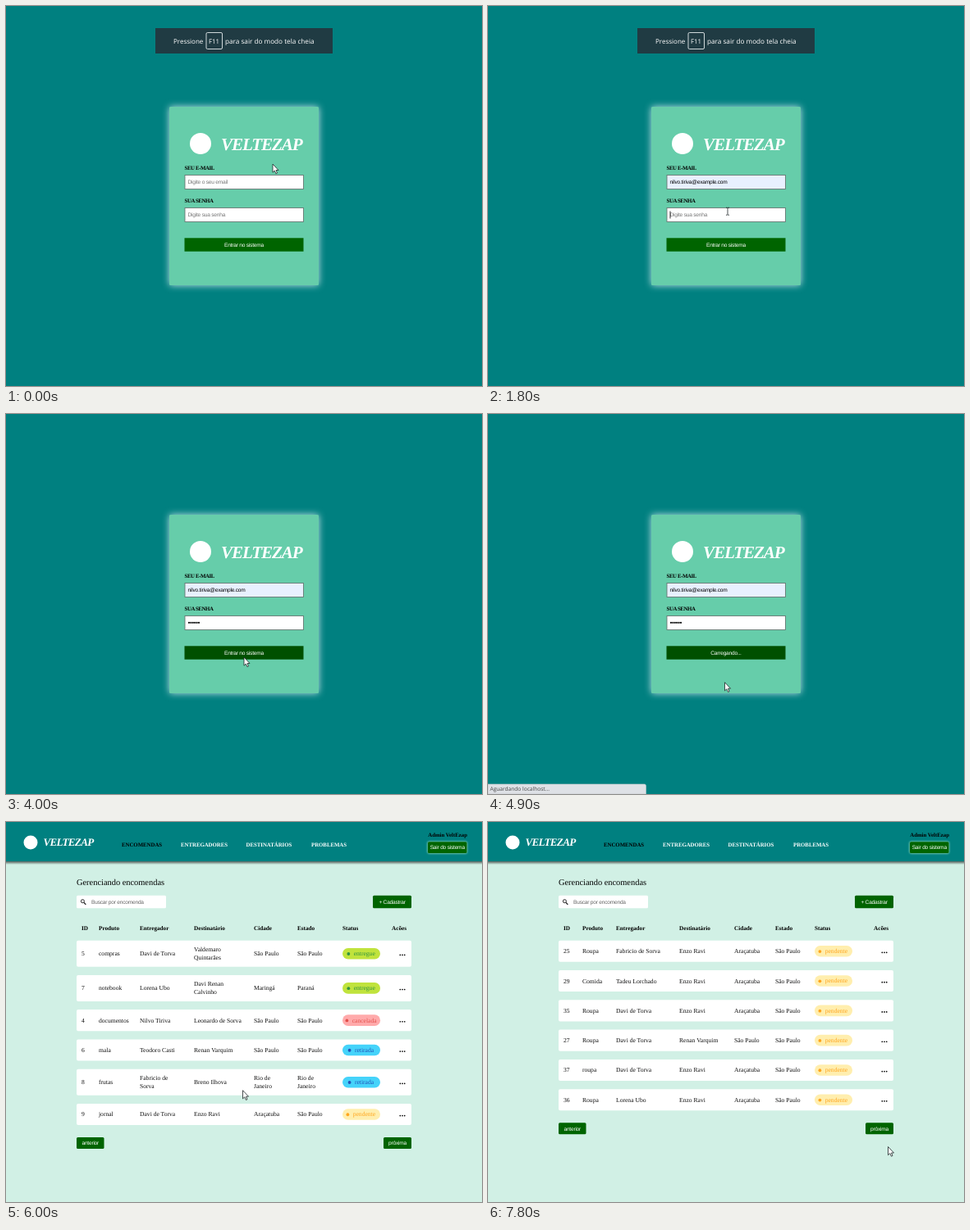
Animation of 580 by 464 pixels, one loop 8 s. Source, as an HTML page:

```html
<!DOCTYPE html>
<html lang="pt-BR">
<head>
<meta charset="utf-8">
<title>Gerenciando encomendas</title>
<style>
html, body { margin: 0; width: 100%; height: 100%; overflow: hidden; background: #008080; }
svg { display: block; width: 100vw; height: 100vh; text-rendering: geometricPrecision; }
.serif { font-family: "Liberation Serif", serif; }
.sans { font-family: "Liberation Sans", sans-serif; letter-spacing: -.033em; }
.ui { font-family: "Open Sans", "Noto Sans", sans-serif; }
.b { font-weight: 700; }
.i { font-style: italic; }
.tight { letter-spacing: -.055em; }
</style>
</head>
<body>
<svg viewBox="0 0 580 464" xmlns="http://www.w3.org/2000/svg">
  <defs>
    <filter id="glow" x="-20%" y="-20%" width="140%" height="140%"><feGaussianBlur stdDeviation="4"/></filter>
    <filter id="soft" x="-20%" y="-50%" width="140%" height="200%"><feGaussianBlur stdDeviation="1.2"/></filter>
    <linearGradient id="shade" x1="0" y1="0" x2="0" y2="1">
      <stop offset="0" stop-color="#000" stop-opacity=".6"/>
      <stop offset="1" stop-color="#000" stop-opacity="0"/>
    </linearGradient>
  </defs>
  <g id="stage"></g>
</svg>
<script>
const LOOP = 8000, STEP = 100;
const stage = document.getElementById('stage');
const GREEN = '#006400', DARK = '#005000';
const EMAIL = 'nilvo.tiriva@example.com';

// Event times in ms
const AT = {
  open: 600, hint: 900, pick: 1400, focus: 1700, fade: 2300, faded: 2800,
  keys: [2400, 2600, 2900, 3100, 3400, 3500],
  hover: 4000, submit: 4700, status: 4800, home: 5000, rows: 5300,
  nextHover: 6900, nextPage: 7300
};

// Pointer stops: time, x, y
const PATH = [
  [100, 325, 193], [500, 300, 215], [600, 298, 216], [900, 295, 243.5],
  [1400, 295, 243.5], [1700, 292, 250.7], [3900, 292, 250.7], [4000, 290, 297],
  [4600, 290, 297], [4900, 288.5, 327.7], [6000, 288.5, 327.7],
  [6800, 486, 402], [6900, 486, 400], [7100, 487.5, 396.5]
];

const STATUS = { // background, text colour, text width
  entregue: ['#c0e33c', '#2f9440', 26.1],
  cancelada: ['#ffaaab', '#e2504c', 30],
  retirada: ['#45d3fa', '#2453b8', 23.6],
  pendente: ['#ffeeae', '#ffa51e', 28]
};

const HEADS = ['ID', 'Produto', 'Entregador', 'Destinatário', 'Cidade', 'Estado', 'Status'];
const EMPTY = { cols: [92, 121, 173, 241, 314, 361, 408], rows: [] };
const PAGE1 = {
  cols: [92, 113, 163, 229, 302, 355, 410],
  rows: [
    '5;compras;Davi de Torva;Valdemaro|Quintarães;São Paulo;São Paulo;entregue',
    '7;notebook;Lorena Ubo;Davi Renan|Calvinho;Maringá;Paraná;entregue',
    '4;documentos;Nilvo Tiriva;Leonardo de Sorva;São Paulo;São Paulo;cancelada',
    '6;mala;Teodoro Casti;Renan Varquim;São Paulo;São Paulo;retirada',
    '8;frutas;Fabricio de|Sorva;Breno Ilhova;Rio de|Janeiro;Rio de|Janeiro;retirada',
    '9;jornal;Davi de Torva;Enzo Ravi;Araçatuba;São Paulo;pendente'
  ]
};
const PAGE2 = {
  cols: [92, 115, 156, 233, 300, 350, 398],
  rows: [
    '25;Roupa;Fabricio de Sorva;Enzo Ravi;Araçatuba;São Paulo;pendente',
    '29;Comida;Tadeu Lorchado;Enzo Ravi;Araçatuba;São Paulo;pendente',
    '35;Roupa;Davi de Torva;Enzo Ravi;Araçatuba;São Paulo;pendente',
    '27;Roupa;Davi de Torva;Renan Varquim;São Paulo;São Paulo;pendente',
    '37;roupa;Davi de Torva;Enzo Ravi;Araçatuba;São Paulo;pendente',
    '36;Roupa;Lorena Ubo;Enzo Ravi;Araçatuba;São Paulo;pendente'
  ]
};

const rect = (x, y, w, h, fill, rx = 0, more = '') =>
  `<rect x="${x}" y="${y}" width="${w}" height="${h}" fill="${fill}" rx="${rx}" ${more}/>`;
const dot = (x, y, r, fill) => `<circle cx="${x}" cy="${y}" r="${r}" fill="${fill}"/>`;
const text = (s, x, y, size, cls, fill = '#000', anchor = 'start') =>
  `<text x="${x}" y="${y}" font-size="${size}" class="${cls}" fill="${fill}" text-anchor="${anchor}">${s}</text>`;
const button = (s, x, y, w, h, fill = GREEN, rx = 1.5) =>
  rect(x, y, w, h, fill, rx) + text(s, x + w / 2, y + h / 2 + 2.3, 6.6, 'sans', '#fff', 'middle');
const field = (y, fill) => rect(218, y, 144.5, 17, fill, 0, 'stroke="#677873" stroke-width=".9"');
const caret = (x, y) => rect(x, y - 4.5, .8, 9, '#000');

function pointerAt(t) {
  if (t <= PATH[0][0]) return PATH[0].slice(1);
  for (let i = 1; i < PATH.length; i++) {
    const [t0, x0, y0] = PATH[i - 1], [t1, x1, y1] = PATH[i];
    if (t < t1) {
      const k = (t - t0) / (t1 - t0), e = k * k * (3 - 2 * k);
      return [x0 + (x1 - x0) * e, y0 + (y1 - y0) * e];
    }
  }
  return PATH[PATH.length - 1].slice(1);
}

function pointer(t) {
  const [x, y] = pointerAt(t);
  const menu = t >= AT.open && t < AT.pick;
  const typing = t < AT.home && !menu && (y > 206 && y < 223 || y > 246 && y < 264);
  const d = typing
    ? 'M-2-4.5h1.5l.5.5.5-.5h1.5M0-4v8M-2 4.5h1.5l.5-.5.5.5h1.5'
    : 'M0 0V10.2L2.3 8.1 3.9 11.7 5.5 11 4 7.5H7Z';
  return `<path transform="translate(${x} ${y})" d="${d}" fill="${typing ? 'none' : '#fff'}"
    stroke="#1c2426" stroke-width=".8" stroke-linejoin="round"/>`;
}

function banner(t) {
  const o = Math.min(1, Math.max(0, (AT.faded - t) / (AT.faded - AT.fade)));
  if (!o) return '';
  return `<g opacity="${o}">` + rect(182, 27, 216, 31, '#203b43') +
    text('Pressione', 204, 45.6, 8, 'ui', '#fff') +
    rect(244, 32.5, 19.5, 20, 'none', 1.5, 'stroke="#e4eaeb" stroke-width=".9"') +
    text('F11', 253.5, 45.6, 7.8, 'ui', '#fff', 'middle') +
    text('para sair do modo tela cheia', 267, 45.6, 8.2, 'ui', '#fff') + '</g>';
}

function menu(t) {
  const items = [EMAIL, 'teste1@example.com', 'nilvo@br.example.com',
    'nilvo@ch.example.com', 'nilvo@au.example.com', 'qwerz@a.example'];
  return rect(217.5, 224.5, 145, 140, '#fff', 1.5) +
    (t >= AT.hint ? rect(217.5, 230, 145, 21.3, '#c8c8c8') : '') +
    items.map((s, i) => text(s, 224, 243 + 21.8 * i, 7.3, 'ui', '#222')).join('');
}

function login(t) {
  const typed = AT.keys.filter(k => k <= t);
  const last = typed.length ? typed[typed.length - 1] : AT.focus;
  const onEmail = t >= AT.open && t < AT.focus;
  const onPass = t >= AT.focus && t < AT.submit;
  const filled = t >= AT.hint;
  const busy = t >= AT.submit;
  let s = rect(0, 0, 580, 464, '#008080') + banner(t) +
    rect(199, 123, 182, 218, '#c4e0e6', 2, 'filter="url(#glow)"') +
    rect(199, 123, 182, 218, '#66cdaa', 1.5) +
    dot(237, 168, 13, '#fff') +
    text('VELTEZAP', 262, 176, 21.2, 'serif b i tight', '#fff') +
    text('SEU E-MAIL', 217.5, 200, 6.8, 'serif b tight') +
    field(206.5, filled ? '#e8f0fe' : '#fff') +
    (filled ? text(EMAIL, 221.5, 217.4, 6.6, 'sans')
            : text('Digite o seu email', 221.5, 217.4, 6.6, 'sans', '#757575')) +
    (onEmail ? caret(221.5, 215) : '') +
    text('SUA SENHA', 217.5, 240, 6.8, 'serif b tight') +
    field(246.5, '#fff');
  if (!typed.length) s += text('Digite sua senha', 221.5, 257.4, 6.6, 'sans', '#757575');
  s += typed.map((_, i) => dot(223 + 2.4 * i, 254.8, 1.1, '#000')).join('');
  if (onPass && (t - last) % 1000 < 500) s += caret(221.6 + 2.4 * typed.length, 255);
  s += button(busy ? 'Carregando...' : 'Entrar no sistema', 217.5, 283.3, 145, 16.4,
    t >= AT.hover ? DARK : GREEN, 0);
  return s + (t >= AT.open && t < AT.pick ? menu(t) : '');
}

function badge(name, x, cy) {
  const [bg, fg, w] = STATUS[name], left = x + 26.7 - w / 2;
  return rect(x, cy - 6.8, 46, 13.6, bg, 6.8) + dot(left - 6.3, cy + .3, 1.9, fg) +
    text(name, left, cy + 2.4, 7.6, 'serif', fg);
}

function table({ cols, rows }, t) {
  let s = HEADS.map((h, i) => text(h, cols[i], 132.3, 7.2, 'serif b')).join('') +
    text('Acões', 488, 132.3, 7.2, 'serif b', '#000', 'end');
  let y = 144.7;
  for (const row of rows) {
    const cells = row.split(';'), h = row.includes('|') ? 32 : 26.1, cy = y + h / 2;
    s += rect(86, y, 408, h, '#fff', 2);
    cells.slice(0, 6).forEach((cell, i) => {
      const lines = cell.split('|');
      lines.forEach((line, n) => {
        s += text(line, cols[i], cy + 2.5 + (n - (lines.length - 1) / 2) * 10, 7.6, 'serif', '#111');
      });
    });
    s += badge(cells[6], cols[6], cy);
    for (let n = 0; n < 3; n++) s += dot(480.3 + 2.7 * n, cy + 1.6, .85, '#000');
    y += h + 10.2;
  }
  const by = rows.length ? y + 4.7 : 149.3;
  const over = t >= AT.nextHover && t < AT.nextPage;
  return s + button('anterior', 86, by, 33.5, 14) +
    button('próxima', 460, by, 34, 14, over ? DARK : GREEN);
}

function home(t) {
  const links = [['ENCOMENDAS', 141], ['ENTREGADORES', 213], ['DESTINATÁRIOS', 292.5], ['PROBLEMAS', 372]];
  const page = t < AT.rows ? EMPTY : t < AT.nextPage ? PAGE1 : PAGE2;
  return rect(0, 0, 580, 464, '#d1f0e5') +
    rect(0, 48, 580, 4, 'url(#shade)') + rect(0, 0, 580, 48, '#008080') +
    dot(30, 25, 8.5, '#fff') +
    text('VELTEZAP', 45.5, 28.8, 13.1, 'serif b i tight', '#fff') +
    links.map(([s, x], i) => text(s, x, 29.6, 6.8, 'serif b', i ? '#fff' : '#000')).join('') +
    text('Admin VeltEzap', 562, 17.8, 6.8, 'serif b', '#000', 'end') +
    rect(513.5, 23.8, 48.5, 14.7, '#8fd6b4', 2, 'filter="url(#soft)"') +
    button('Sair do sistema', 514, 24.3, 47.5, 13.7) +
    text('Gerenciando encomendas', 86, 76.7, 10.4, 'serif') +
    rect(86, 89.7, 109, 15.6, '#fff', 1.5) +
    '<path d="M95 98.3L97.3 100.8" stroke="#111" stroke-width="1.2"/>' +
    '<circle cx="93.4" cy="96.7" r="2" fill="none" stroke="#111" stroke-width=".9"/>' +
    text('Buscar por encomenda', 104, 99.8, 6.6, 'sans', '#666') +
    button('+ Cadastrar', 447, 89.7, 47, 15.6) +
    table(page, t);
}

function statusBar(t) {
  if (t < AT.status || t >= AT.rows) return '';
  return '<path d="M0 452H190.5Q192.5 452 192.5 454V464H0Z" fill="#dee1e6" stroke="#c3c8cc" stroke-width=".6"/>' +
    text('Aguardando localhost...', 2.5, 460.4, 6.6, 'ui', '#444');
}

let shown = -1;
function frame(now) {
  const t = Math.floor(now % LOOP / STEP) * STEP;
  if (t !== shown) {
    shown = t;
    stage.innerHTML = (t < AT.home ? login(t) : home(t)) + statusBar(t) + pointer(t);
  }
  requestAnimationFrame(frame);
}
frame(performance.now());
</script>
</body>
</html>
```
